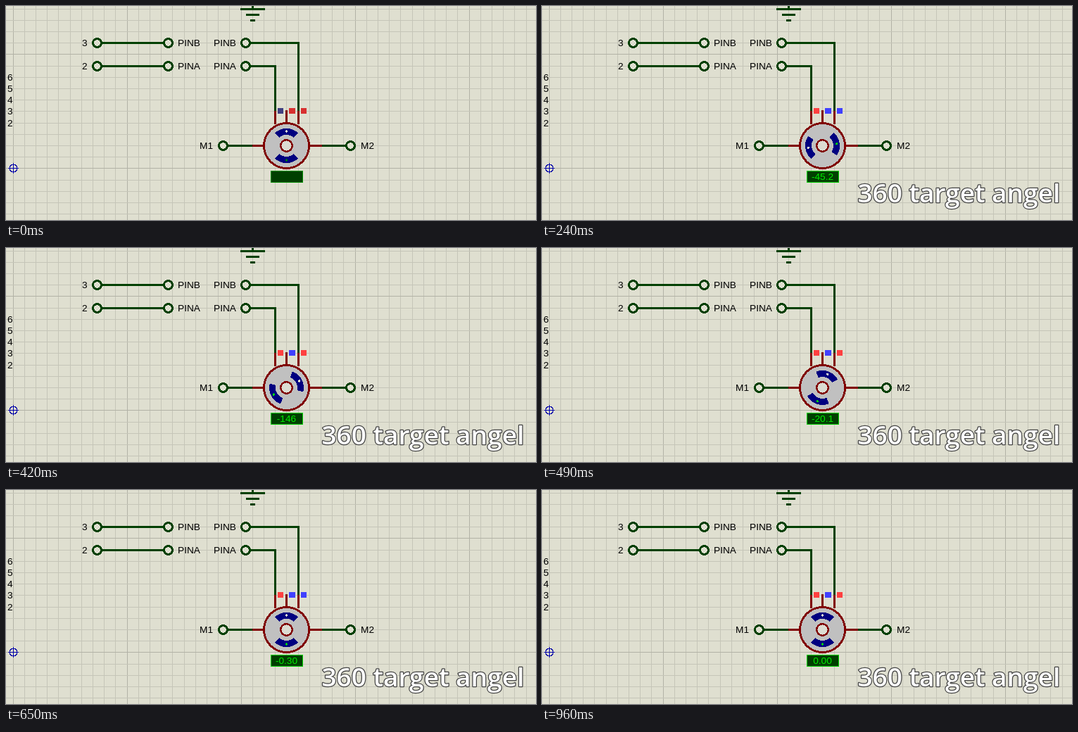
Recreate the animation shown at these times as an HTML page. Size 753 px wide and 304 px high, loop 1.04 s.

```html
<!DOCTYPE html>
<html lang="en">
<head>
<meta charset="utf-8">
<title>Encoder motor position control</title>
<style>
html, body { margin: 0; height: 100%; overflow: hidden; background: #dfdfd0; }
svg { display: block; }
text { font: 13.7px "Liberation Sans", Arial, sans-serif; }
.wire { fill: none; stroke: #004000; stroke-width: 3; }
.pin { fill: none; stroke: #800000; stroke-width: 3; }
.term { fill: #dfdfd0; stroke: #004000; stroke-width: 3; }
.magnet { fill: none; stroke: #000080; stroke-width: 9; }
#value { fill: #00e800; text-anchor: middle; }
#caption {
  font: 600 37px "Open Sans", "Noto Sans", sans-serif;
  fill: #fff; stroke: #444; stroke-width: 2.5; stroke-linejoin: round; paint-order: stroke;
}
</style>
</head>
<body>
<svg width="753" height="304" viewBox="0 0 753 304" shape-rendering="crispEdges">
  <g id="grid"></g>
  <g class="wire">
    <path d="M350.500 0V4M333 4.500H368M341 12.500H360M347 20.500H354"/>
    <path d="M129 52.500H230M129 85.500H230M340 52.500H415.500V150M340 85.500H382.500V150M308 198.500H350M449 198.500H489"/>
  </g>
  <path class="pin" d="M382.500 149V168M398.500 148V168M415.500 149V168M350 198.500H366M431 198.500H449"/>
  <g id="terms"></g>
  <g id="labels"></g>
  <g id="leds"></g>
  <g transform="translate(398.500 198.500)">
    <circle r="32" fill="#c0c0c0" stroke="#800000" stroke-width="3"/>
    <g id="rotor">
      <path class="magnet" d="M-13.400 -14.900A20 20 0 0 1 13.400 -14.900M-13.400 14.900A20 20 0 0 0 13.400 14.900"/>
      <circle cy="-20.500" r="1.600" fill="#ffffd8"/>
      <circle id="dot" cy="20.500" r="1.600"/>
    </g>
    <circle r="8.300" fill="#dcdcd2" stroke="#800000" stroke-width="2.500"/>
  </g>
  <rect id="box" x="376.500" y="234.500" width="45" height="16" fill="#004000"/>
  <text id="value" x="398.500" y="247"></text>
  <g fill="none" stroke="#0000a8">
    <circle cx="10.500" cy="230.500" r="5.500"/>
    <path d="M3 230.500H18M10.500 223V238"/>
  </g>
  <text id="caption" x="448.500" y="278.500">360 target angel</text>
</svg>
<script>
const $ = id => document.getElementById(id);

function add(parent, tag, attrs, text = '') {
  const el = document.createElementNS('http://www.w3.org/2000/svg', tag);
  for (const k in attrs) el.setAttribute(k, attrs[k]);
  el.textContent = text;
  return $(parent).appendChild(el);
}

// Minor lines every 16.2 px, major lines every tenth
function gridLines(axis, origin, size) {
  for (const major of [false, true]) {
    const step = major ? 162 : 16.2;
    for (let p = origin % step; p < size; p += step) {
      const at = Math.floor(p) + .5;
      const d = axis === 'x' ? `M${at} 0V304` : `M0 ${at}H753`;
      add('grid', 'path', { d, stroke: major ? '#b2b2a6' : '#c5c5b8' });
    }
  }
}
gridLines('x', 10.1, 753);
gridLines('y', 68.9, 304);

for (const [x, y] of [[129, 52], [230, 52], [340, 52], [129, 85], [230, 85], [340, 85], [308, 198], [489, 198]])
  add('terms', 'circle', { class: 'term', cx: x + .5, cy: y + .5, r: 6 });

const label = (x, y, text) => add('labels', 'text', { x, y }, text);
[['3', 'PINB', 57], ['2', 'PINA', 90]].forEach(([num, name, y]) => {
  label(108, y, num);
  label(244, y, name);
  label(295, y, name);
});
label(275, 203, 'M1');
label(504, 203, 'M2');
for (let n = 6; n > 1; n--) label(2, Math.floor(106.3 + (6 - n) * 16.2), n);

const leds = [[386, 8], [402, 9], [419, 8]].map(([x, width]) =>
  add('leds', 'rect', { x, y: 145, width, height: 8 }));

const red = '#ff4040', blue = '#4040ff', dim = '#d83030';
// start ms, rotor degrees, readout, pin states
const steps = [
  [0, 0, '', ['#404080', dim, dim]],
  [170, 348, '-45.2', ['#804040', blue, blue]],
  [240, 262, '-45.2', [red, blue, blue]],
  [340, 148, '-146', [red, blue, blue]],
  [420, 62, '-146', [red, blue, red]],
  [490, 20, '-20.1', [red, blue, red]],
  [570, 2.79, '-2.79', [red, blue, red]],
  [650, .3, '-0.30', [red, blue, blue]],
  [730, 0, '-0.01', [red, blue, red]],
  [960, 0, '0.00', [red, blue, red]]
];

function draw(now) {
  const t = now % 1040;
  const [start, angle, value, pins] = steps.findLast(s => s[0] <= t);
  const on = start > 0;
  $('rotor').setAttribute('transform', `rotate(${angle})`);
  $('value').textContent = value;
  $('box').setAttribute('stroke', on ? '#00d000' : '#008c00');
  $('dot').setAttribute('fill', on ? '#00e000' : '#008000');
  $('caption').setAttribute('visibility', on ? 'visible' : 'hidden');
  leds.forEach((led, i) => led.setAttribute('fill', pins[i]));
  requestAnimationFrame(draw);
}
draw(0);
</script>
</body>
</html>
```
